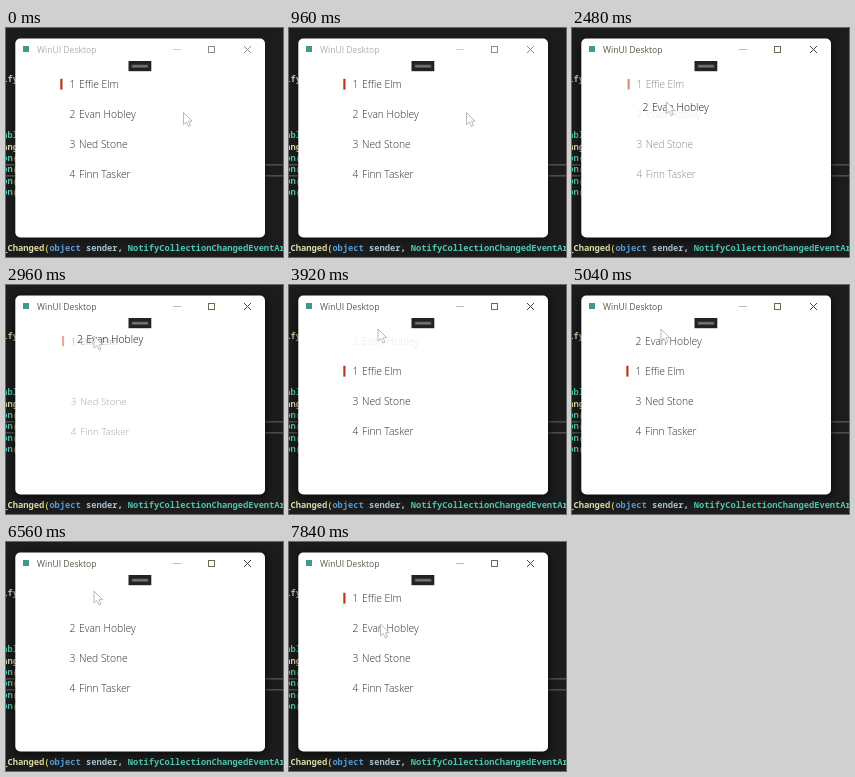
An HTML page with a canvas for the animation above (8000 ms loop, 277 px wide and 229 px high).

```html
<!DOCTYPE html>
<html lang="en">
<head>
<meta charset="utf-8">
<title>List reorder</title>
<style>
html, body { margin: 0; width: 100%; height: 100%; overflow: hidden; background: #1c1c1c; }
canvas { display: block; width: 277px; height: 229px; }
</style>
</head>
<body>
<canvas id="stage" width="277" height="229"></canvas>
<script>
const ctx = document.getElementById('stage').getContext('2d');
const LOOP = 8000;
const UI = '"Open Sans", "Noto Sans", sans-serif';
const CODE = '"Noto Sans Mono", "DejaVu Sans Mono", monospace';
const NAMES = ['Effie Elm', 'Evan Hobley', 'Ned Stone', 'Finn Tasker'];
const ROWS = [56, 86, 116, 146];

const clamp = v => Math.min(1, Math.max(0, v));
const ramp = (t, a, b) => clamp((t - a) / (b - a));
const smooth = (t, a, b) => { const p = ramp(t, a, b); return p * p * (3 - 2 * p); };
const mix = (a, b, p) => a + (b - a) * p;

// Interpolates keys of the form [time, x, y].
function track(t, keys) {
  if (t <= keys[0][0]) return keys[0].slice(1);
  for (let i = 1; i < keys.length; i++) {
    const [a, b] = [keys[i - 1], keys[i]];
    if (t < b[0]) {
      const p = ramp(t, a[0], b[0]);
      return [mix(a[1], b[1], p), mix(a[2], b[2], p)];
    }
  }
  return keys[keys.length - 1].slice(1);
}

function rect(x, y, w, h, color) {
  ctx.fillStyle = color;
  ctx.fillRect(x, y, w, h);
}

function text(str, x, y, font, color) {
  ctx.font = font;
  ctx.fillStyle = color;
  ctx.fillText(str, x, y);
}

function line(color, width, ...points) {
  ctx.strokeStyle = color;
  ctx.lineWidth = width;
  ctx.beginPath();
  points.forEach(([x, y], i) => i ? ctx.lineTo(x, y) : ctx.moveTo(x, y));
  ctx.stroke();
}

function code(y, ...runs) {
  let x = -3.7;
  for (const [str, color] of runs) {
    text(str, x, y, '600 8.73px ' + CODE, color);
    x += ctx.measureText(str).width;
  }
}

function drawEditor() {
  rect(0, 0, 277, 229, '#1c1c1c');
  rect(0, 136, 277, 1.6, '#4c4c4c');
  rect(0, 147, 277, 1.6, '#4c4c4c');
  const teal = '#4ec9b0', yellow = '#dcdcaa', paren = '#d8c050';
  code(54, ['ify', '#b8d7a3']);
  code(110, ['abl', teal]);
  code(122, ['ang', yellow]);
  for (let i = 0; i < 4; i++) code(133 + i * 11.3, ['on', teal], ['(', paren]);
  code(223, ['_Changed', yellow], ['(', paren], ['object ', '#569cd6'],
    ['sender', '#a9c4d2'], [', ', '#d4d4d4'], ['NotifyCollectionChangedEventArgs', teal]);
}

function drawWindow(active) {
  ctx.save();
  ctx.shadowColor = active ? 'rgba(0,0,0,.75)' : 'rgba(0,0,0,.45)';
  ctx.shadowBlur = active ? 10 : 6;
  ctx.shadowOffsetY = 2;
  ctx.fillStyle = '#fff';
  ctx.beginPath();
  ctx.roundRect(9.3, 10.6, 249.7, 198.9, 5);
  ctx.fill();
  ctx.restore();

  const ink = active ? '#44443a' : '#8c8c8c';
  rect(17, 18, 6, 6, '#3f9a8c');
  text('WinUI Desktop', 31, 25, '8.6px ' + UI, active ? '#5a5a48' : '#b0b0b0');
  line(active ? '#bbb' : '#ccc', 1, [167, 21.5], [175, 21.5]);
  ctx.strokeStyle = active ? '#6b6b55' : '#8c8c8c';
  ctx.strokeRect(202.5, 18.5, 6, 6);
  line(ink, 1, [238, 18], [245, 25]);
  line(ink, 1, [245, 18], [238, 25]);

  rect(122.5, 33, 22.8, 10.2, '#222');
  rect(125.5, 36.5, 17, 3.5, '#484848');
  rect(126.5, 37.3, 15, 1.8, '#777');
}

function drawItem(index, y, { alpha = 1, dim = 0, dx = 0, dragged = false } = {}) {
  if (alpha <= 0) return;
  ctx.save();
  ctx.globalAlpha = alpha * mix(1, 0.42, dim);
  const scale = mix(1, 0.96, dim);
  ctx.translate(97 + dx, y);
  ctx.scale(scale, scale);
  if (index === 0) {
    if (dragged) rect(-42, -4, 2, 8, '#d3202a');
    else rect(-42.7, -5.2, 2.2, 10.8, '#b83a12');
  }
  const font = '300 10.3px ' + UI, color = dragged ? '#111' : '#2c2c2c';
  text(String(index + 1), -33.5, 4, font, color);
  text(NAMES[index], -24, 4, font, color);
  ctx.restore();
}

function drawList(t) {
  const dimFirst = smooth(t, 2160, 2640) * (1 - ramp(t, 3640, 3800));
  const dimSecond = ramp(t, 5480, 6000) * (1 - ramp(t, 6360, 6480));
  const dim = Math.max(dimFirst, dimSecond);
  const firstDown = smooth(t, 3120, 3360);
  const secondDown = smooth(t, 5920, 6160);

  const firstAlpha = t < 6500 ? 1 - ramp(t, 5680, 6000) : ramp(t, 6580, 7120);
  const secondAlpha = t < 3800 ? 1 - ramp(t, 2160, 2560) : ramp(t, 3860, 4400);

  const firstY = t < 6400 ? mix(ROWS[0], ROWS[1], firstDown) : ROWS[0];
  const secondY = t < 3680 ? ROWS[1] : mix(ROWS[0], ROWS[1], secondDown);
  drawItem(0, firstY, { alpha: firstAlpha, dim });
  drawItem(1, secondY, { alpha: secondAlpha, dim });
  drawItem(2, ROWS[2], { dim });
  drawItem(3, ROWS[3], { dim });
}

function drawDragged(t) {
  if (t >= 2240 && t < 3680) {
    const [dx, y] = track(t, [[2240, 0, 86], [2500, 7.5, 78], [2960, 7.5, 54], [3600, 8, 46]]);
    drawItem(1, y, { dx, dragged: true });
  } else if (t >= 5520 && t < 6400) {
    const [dx, y] = track(t, [[5520, 8, 86], [5680, 13, 71], [6320, 13, 53]]);
    drawItem(0, y, { dx, dragged: true });
  }
}

function cursorAt(t) {
  if (t < 1360) return [177.5, 84.5];
  if (t < 5280) return track(t, [[2240, 97.5, 85], [2960, 88, 51], [3600, 89, 44]]);
  if (t < 7840) return track(t, [[5520, 90, 82], [5680, 90, 66], [6320, 88, 49]]);
  return [91.5, 82];
}

function drawCursor(t) {
  const [x, y] = cursorAt(t);
  ctx.save();
  ctx.translate(x, y);
  ctx.beginPath();
  [[0, 0], [0, 12], [2.8, 9.5], [5, 14], [7, 13], [5, 8.8], [8.6, 8.6]]
    .forEach(([px, py]) => ctx.lineTo(px, py));
  ctx.closePath();
  ctx.fillStyle = '#fff';
  ctx.fill();
  ctx.strokeStyle = '#a8a8a8';
  ctx.lineWidth = 0.8;
  ctx.stroke();
  ctx.restore();
}

function draw(now) {
  const t = Math.floor((now % LOOP) / 80) * 80;
  drawEditor();
  drawWindow(t >= 2000);
  drawList(t);
  drawDragged(t);
  drawCursor(t);
  requestAnimationFrame(draw);
}
requestAnimationFrame(draw);
</script>
</body>
</html>
```
